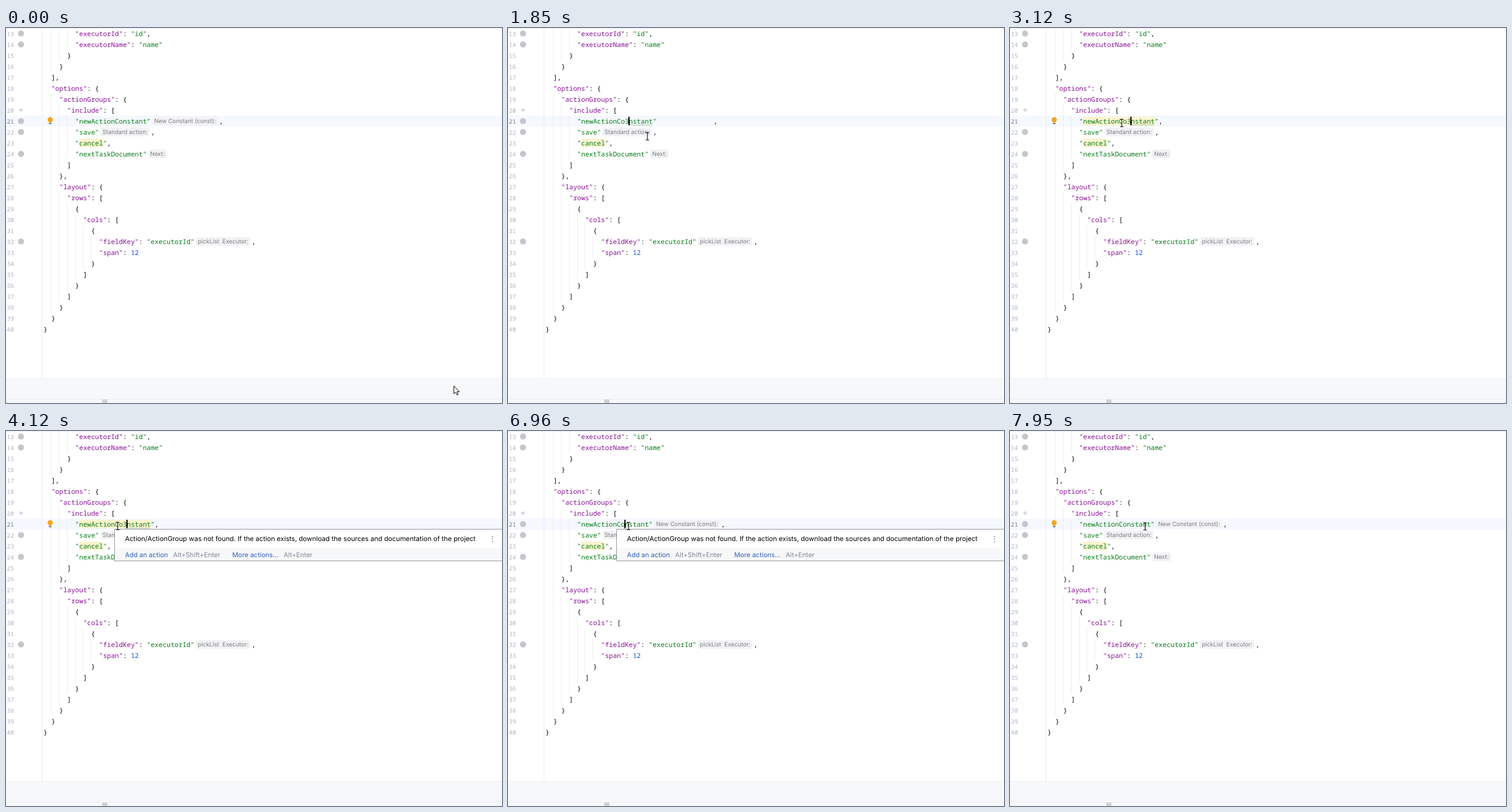
Recreate the animation shown at these times as an HTML page. Size 861 by 651 pixels, loop 8 s.

```html
<!DOCTYPE html>
<html lang="en">
<head>
<meta charset="utf-8">
<title>JSON editor inspection</title>
<style>
  html, body { margin: 0; width: 100%; height: 100%; overflow: hidden; background: #fff; }
  svg { display: block; width: 861px; height: 651px; }
  text { white-space: pre; text-rendering: geometricPrecision; }
  .code { font: 11.5px "Noto Sans Mono", "DejaVu Sans Mono", monospace; fill: #080808; }
  .num { font: 10.2px "Noto Sans Mono", "DejaVu Sans Mono", monospace; fill: #aeb3c2; }
  .hint { font: 10.15px Inter, "Liberation Sans", sans-serif; fill: #7c7e84; }
  .message { font: 11.6px Inter, "Liberation Sans", sans-serif; fill: #000; }
  .actions { font: 11.45px Inter, "Liberation Sans", sans-serif; fill: #818594; }
  .link { fill: #315fbd; }
  .current { fill: #767a8a; }
  .key { fill: #871094; }
  .string { fill: #067d17; }
  .number { fill: #1750eb; }
</style>
</head>
<body>
<svg id="stage" viewBox="0 0 861 651"></svg>
<script>
const DURATION = 8000;
const LEFT = 64.9, ADVANCE = 6.9, LINE = 19, FIRST = 13, ACTIVE = 21;
const RULE = '#ebecf0', PANEL = '#f7f8fa', WARNING = '#fcf3d0';
const stage = document.getElementById('stage');

// Inlay hints stand between angle brackets; the active line is drawn separately.
const source = `\
        "executorId": "id",
        "executorName": "name"
      }
    }
  ],
  "options": {
    "actionGroups": {
      "include": [
        
        "save"⟨Standard action:⟩,
        "cancel",
        "nextTaskDocument"⟨Next:⟩
      ]
    },
    "layout": {
      "rows": [
        {
          "cols": [
            {
              "fieldKey": "executorId"⟨pickList\u00a0 Executor:⟩,
              "span": 12
            }
          ]
        }
      ]
    }
  }
}`;

function add(tag, attrs = {}, parent = stage, content = '') {
  const node = document.createElementNS('http://www.w3.org/2000/svg', tag);
  for (const name in attrs) node.setAttribute(name, attrs[name]);
  if (content) node.textContent = content;
  parent.appendChild(node);
  return node;
}
const rect = (x, y, width, height, fill, parent) => add('rect', { x, y, width, height, fill }, parent);
const label = (cls, x, y, content, parent) => add('text', { class: cls, x, y }, parent, content);
const move = (node, x, y) => node.setAttribute('transform', `translate(${x} ${y})`);
const show = (node, on) => node.setAttribute('display', on ? 'inline' : 'none');
const columnX = col => LEFT + col * ADVANCE;
const rowTop = row => (row - FIRST) * LINE;
const baseline = row => rowTop(row) + 13.5;

function highlight(row, col, length) {
  return rect(Math.floor(columnX(col)), rowTop(row) + 2, length * ADVANCE, 15, WARNING);
}

function code(col, content, row) {
  const text = label('code', columnX(col), baseline(row), '');
  const token = /(?<key>"[^"]*"(?=:))|(?<string>"[^"]*")|(?<number>\d+)|[^"\d]+/g;
  for (const { 0: part, groups } of content.matchAll(token))
    add('tspan', { class: Object.keys(groups).find(name => groups[name]) || '' }, text, part);
  return text;
}

// A hint after the given column; returns its group and the space it takes.
function inlay(col, content, row) {
  const group = add('g');
  const box = rect(columnX(col) + 2.8, rowTop(row) + 2, 0, 15, '#f2f2f4', group);
  const text = label('hint', columnX(col) + 6, baseline(row) - 0.5, content, group);
  const width = text.getComputedTextLength() + 6.4;
  box.setAttribute('width', width);
  box.setAttribute('rx', 3);
  return { group, space: width + 5.3 };
}

const gutterIcon = row => add('circle', { cx: 26, cy: rowTop(row) + 9.5, r: 5.3, fill: '#c4c6cc' });

// Editor background
rect(0, 0, 861, 651, '#fff');
rect(0, rowTop(ACTIVE), 861, LINE, '#f5f8fe');
rect(0, 0, 861, 1, RULE);
rect(62, 0, 1, 608, RULE);
rect(0, 608, 861, 43, PANEL);
rect(0, 608, 861, 1, RULE);
rect(0, 644, 861, 1, RULE);
rect(167, 645, 9, 6, '#ced1d8');

highlight(23, 9, 6);
const warning = highlight(ACTIVE, 9, 18);

source.split('\n').forEach((line, i) => {
  const row = FIRST + i, indent = line.search(/\S|$/);
  label(row === ACTIVE ? 'num current' : 'num', 1.6, baseline(row), String(row));
  for (let col = 2; col < indent; col += 2)
    rect(Math.floor(columnX(col)), rowTop(row), 1, LINE, RULE);

  const [content, hint, tail] = line.trim().split(/[⟨⟩]/);
  code(indent, content, row);
  if (hint) {
    const end = indent + content.length;
    const { space } = inlay(end, hint, row);
    code(end + space / ADVANCE, tail, row);
  }
});
[13, 14, 22, 24, 32].forEach(gutterIcon);
const activeIcon = gutterIcon(ACTIVE);
add('path', { d: 'M22.5 142.5h7M26 139v7', stroke: '#b4b7c0', fill: 'none' });

// Active line
const WORD = '"newActionConstant"', TYPO = '"newActionCo3nstant"';
const action = label('code string', columnX(8), baseline(ACTIVE), WORD);
const comma = label('code', 0, baseline(ACTIVE), ',');
const actionHint = inlay(8 + WORD.length, 'New Constant (const):', ACTIVE);
const typoLine = add('path', { d: 'M210 168.5' + 'q1 -1.6 2 0t2 0'.repeat(10), fill: 'none', stroke: '#9cc08f' });
const caret = rect(0, 154, 2, 15, '#000');

const bulb = add('g');
add('circle', { cx: 76.7, cy: 159.3, r: 4.5, fill: '#f2a61c' }, bulb);
rect(74.7, 162, 4, 2.5, '#f2a61c', bulb);
rect(74.7, 165, 4, 2, '#6c707e', bulb);

// Inspection popup
const popup = add('g');
rect(188, 170, 680, 56, '#94969c', popup);
rect(189, 171, 680, 54, '#fff', popup);
rect(189, 203, 680, 22, PANEL, popup);
label('message', 206.5, 191, 'Action/ActionGroup was not found. If the action exists, download the sources and documentation of the project', popup);
const actions = label('actions', 206.5, 218.5, '', popup);
[['Add an action', 'Alt+Shift+Enter'], ['More actions…', 'Alt+Enter']].forEach(([name, shortcut], i) => {
  add('tspan', { class: 'link', dx: i * 20.5 }, actions, name);
  add('tspan', { dx: 9 }, actions, shortcut);
});
for (let i = -1; i <= 1; i++)
  add('circle', { cx: 844.5, cy: 187.5 + i * 4.5, r: 0.9, fill: '#6c707e' }, popup);

// Pointers
const arrow = add('path', { d: 'M.5 .5v13.5l3.2-2.9 2.3 5 2.100-1-2.200-4.800h4.200z', fill: '#fff', stroke: '#000', 'stroke-linejoin': 'round' });
const beam = add('path', { d: 'M-3-6.5h2l1 1 1-1h2M0-5.5v11M-3 6.5h2l1-1 1 1h2', fill: 'none', stroke: '#000', 'stroke-width': 1.1 });

const moves = [
  { from: 30, to: 490, x: 207, y: 163 },
  { from: 1660, to: 1850, x: 242, y: 188 },
  { from: 1850, to: 2150, x: 282, y: 188 },
  { from: 2320, to: 2740, x: 194, y: 165 },
  { from: 6900, to: 6960, x: 209, y: 165 },
  { from: 6960, to: 7650, x: 235, y: 156 },
  { from: 7800, to: 7950, x: 234.5, y: 165.5 }
];
const caretResets = [690, 1660, 2115, 4585, 6730];
const bulbHides = [690, 1660, 2115, 4420, 6730];

const clamp = value => Math.min(1, Math.max(0, value));
const smooth = p => p * p * (3 - 2 * p);
const within = (t, from, to) => t >= from && t < to;
const sinceLast = (times, t) => t - Math.max(-DURATION, ...times.filter(time => time <= t));

function pointerAt(t) {
  let x = 777, y = 621;
  for (const step of moves) {
    const p = smooth(clamp((t - step.from) / (step.to - step.from)));
    x += (step.x - x) * p;
    y += (step.y - y) * p;
  }
  return [x, y];
}

function render(t) {
  const edited = within(t, 1660, 6730), unresolved = within(t, 1800, 6900);
  const word = edited ? TYPO : WORD;
  if (action.textContent !== word) action.textContent = word;

  const gap = unresolved ? actionHint.space * (1 - clamp((t - 1800) / 300)) : actionHint.space;
  comma.setAttribute('x', columnX(8 + word.length) + gap);
  show(actionHint.group, !unresolved);
  move(actionHint.group, edited ? ADVANCE : 0, 0);

  show(activeIcon, !within(t, 2120, 6900));
  show(warning, within(t, 2420, 6760));
  show(typoLine, within(t, 1800, 6760));
  show(popup, within(t, 3280, 7060));
  show(bulb, sinceLast(bulbHides, t) >= 600);

  caret.setAttribute('x', Math.floor(columnX(edited ? 21 : 20)));
  show(caret, within(t, 690, 7700) && sinceLast(caretResets, t) % 990 < 495);

  const [x, y] = pointerAt(t), overEditor = y < 608;
  show(arrow, !overEditor);
  show(beam, overEditor);
  move(overEditor ? beam : arrow, x, y);
}

const start = performance.now();
function tick() {
  render((performance.now() - start) % DURATION);
  requestAnimationFrame(tick);
}
tick();
</script>
</body>
</html>
```
